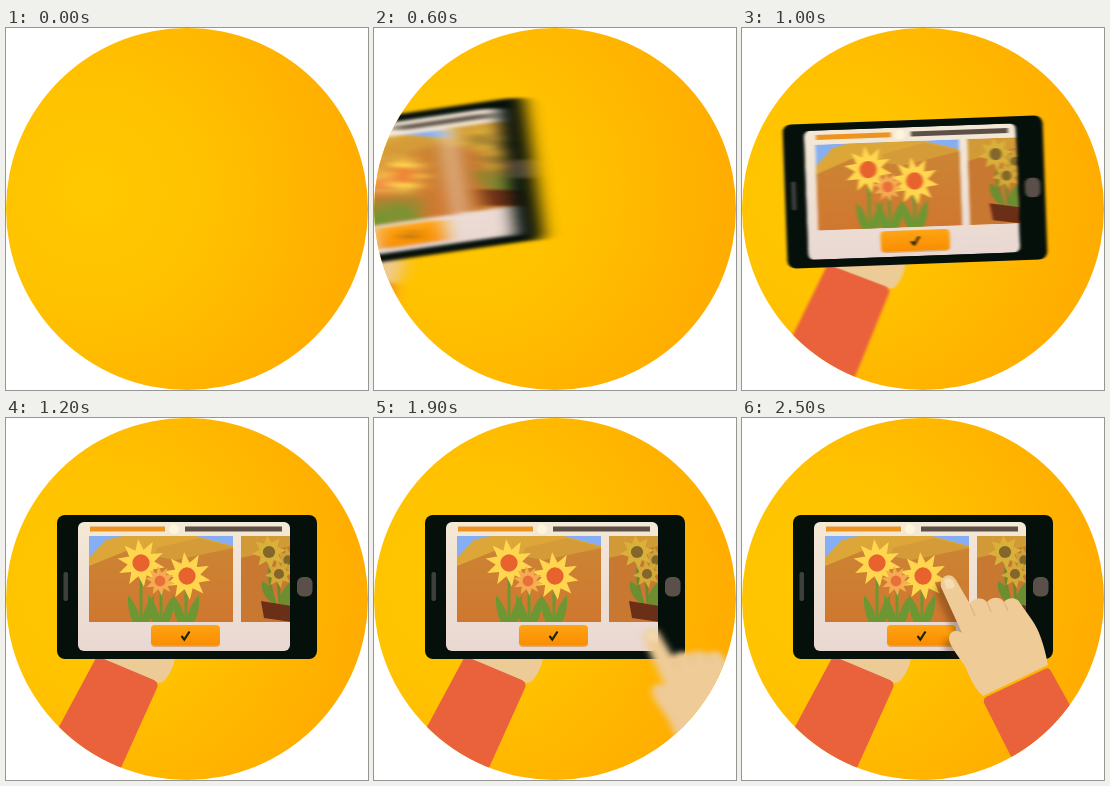
Animation of 362 by 362 pixels, one loop 2.6 s. Source, as an HTML page:

```html
<!DOCTYPE html>
<html lang="en">
<head>
<meta charset="utf-8">
<title>Phone in hand</title>
<style>
  html, body { margin: 0; width: 100%; height: 100%; overflow: hidden; background: #fff; }
  svg { display: block; width: 100vw; height: 100vh; }
</style>
</head>
<body>
<svg viewBox="0 0 362 362">
  <defs>
    <radialGradient id="sun" gradientUnits="userSpaceOnUse" cx="85" cy="165" r="285">
      <stop offset="0" stop-color="#ffc900"/>
      <stop offset=".4" stop-color="#ffc200"/>
      <stop offset="1" stop-color="#ffab00"/>
    </radialGradient>
    <linearGradient id="gold" x2="0" y2="1">
      <stop offset="0" stop-color="#ffa414"/>
      <stop offset="1" stop-color="#f98d00"/>
    </linearGradient>
    <linearGradient id="paper" x2="0" y2="1">
      <stop offset="0" stop-color="#f4e8d6"/>
      <stop offset="1" stop-color="#e9d8d2"/>
    </linearGradient>
    <linearGradient id="soil" x2="0" y2="1">
      <stop offset="0" stop-color="#cb8434"/>
      <stop offset="1" stop-color="#d0772f"/>
    </linearGradient>
    <clipPath id="disc"><circle cx="181" cy="181" r="181"/></clipPath>
    <clipPath id="screen"><rect x="72" y="104" width="212" height="129" rx="6"/></clipPath>
    <clipPath id="photo"><rect x="83" y="118" width="144" height="86"/></clipPath>
    <clipPath id="nextPhoto"><rect x="235" y="118" width="50" height="86"/></clipPath>
    <clipPath id="body"><rect x="51" y="97" width="260" height="144" rx="8"/></clipPath>
    <filter id="phoneBlur" filterUnits="userSpaceOnUse" x="-150" y="-50" width="660" height="460" color-interpolation-filters="sRGB"><feGaussianBlur/></filter>
    <filter id="handBlur" filterUnits="userSpaceOnUse" x="-50" y="-50" width="560" height="460" color-interpolation-filters="sRGB"><feGaussianBlur/></filter>
    <filter id="soft" filterUnits="userSpaceOnUse" x="150" y="120" width="200" height="200"><feGaussianBlur stdDeviation="3"/></filter>
    <path id="palm" d="M199 169C197 158 208 153 214 162L228 186C231 180 240 178 245 184C249 179 258 178 262 184C266 179 275 179 278 185L290 202C297 212 302 226 306 247L241 278C234 272 228 261 224 250C218 240 208 229 207 221C207 213 214 211 220 215Z"/>
  </defs>

  <g clip-path="url(#disc)">
    <rect width="362" height="362" fill="url(#sun)"/>

    <g id="phoneLayer"><g id="phone">
      <path d="M92 238H169C169 246 164 256 159 262Q156 266 150 264L92 240Z" fill="#edcb96"/>
      <path d="M90 240Q93 238 98 241L148 262Q153 265 151 270L105 372H19Z" fill="#e9623c"/>
      <rect x="51" y="97" width="260" height="144" rx="8" fill="#06100b"/>
      <rect x="57.5" y="154" width="4.5" height="29" rx="2" fill="#3f403c"/>
      <rect x="291" y="159" width="15.5" height="19.5" rx="6" fill="#5b4f4a"/>
      <g clip-path="url(#screen)">
        <rect x="72" y="104" width="212" height="129" fill="url(#paper)"/>
        <path d="M84 108.500h75v5h-75z" fill="#ed9420"/>
        <path d="M179 108.500h97v5h-97z" fill="#5d5048"/>
        <circle cx="168" cy="111" r="5" fill="#fff4dc"/>

        <g clip-path="url(#photo)">
          <rect x="83" y="118" width="144" height="86" fill="#86aef2"/>
          <path d="M83 140L100 122L116 118H190L227 128V204H83Z" fill="#dda638"/>
          <path d="M150 130L192 120L227 129V160H150Z" fill="#d59b38"/>
          <path d="M83 148L120 133L170 142L227 130V204H83Z" fill="url(#soil)"/>
          <g id="leaves" fill="#6d9733"></g>
          <g id="flowers"></g>
        </g>

        <g clip-path="url(#nextPhoto)">
          <rect x="235" y="118" width="50" height="86" fill="#d29a36"/>
          <path d="M235 140L285 128V204H235Z" fill="#c87830"/>
          <path d="M264 146Q262 165 269 186M272 160Q273 172 274 188" stroke="#71872e" stroke-width="3" fill="none"/>
          <path d="M268 186Q254 178 256 163Q268 168 270 187ZM273 188Q274 172 284 164V188Z" fill="#6d8d31"/>
          <g id="nextFlowers"></g>
          <path d="M255 183L285 188V204L258 200Z" fill="#6b2e16"/>
        </g>

        <rect x="145" y="208" width="69" height="21" rx="4" fill="#cf8e48" opacity=".6"/>
        <rect x="145" y="207" width="69" height="20.500" rx="4" fill="url(#gold)"/>
        <path d="M175.500 218L178.300 221.500L183.500 213.500" fill="none" stroke="#20200e" stroke-width="2.200"/>
      </g>
    </g></g>

    <g clip-path="url(#body)">
      <use id="shade" href="#palm" x="-5" y="7" fill="#301800" filter="url(#soft)"/>
    </g>
    <g id="handLayer"><g id="hand">
      <use href="#palm" fill="#eecb97"/>
      <path d="M202 163Q206 157 211 163L213 169Q208 172 204 170Z" fill="#f5dcb2"/>
      <path d="M245 184L249 194M262 184L266 193M228 186L233 198" stroke="#ddb580" stroke-width="1.200" fill="none"/>
      <path d="M244 279L303 251Q307 249 309 253L360 345L300 400L242 285Q241 281 244 279Z" fill="#e9623c"/>
    </g></g>
  </g>
</svg>

<script>
const $ = id => document.getElementById(id);
const NS = 'http://www.w3.org/2000/svg';
const LOOP = 2600, STEP = 100;

function add(parent, tag, attrs) {
  const el = document.createElementNS(NS, tag);
  for (const key in attrs) el.setAttribute(key, attrs[key]);
  parent.append(el);
}

function flower(parent, x, y, r, petal, core, petals = 10) {
  const points = Array.from({ length: petals * 2 }, (_, i) => {
    const angle = Math.PI * (i / petals - .5) - .12, d = i % 2 ? r * .56 : r;
    return [x + d * Math.cos(angle), y + d * Math.sin(angle)].map(n => n.toFixed(1));
  });
  add(parent, 'polygon', { points: points.join(' '), fill: petal });
  add(parent, 'circle', { cx: x, cy: y, r: r * .36, fill: core });
}

function plant(x, top) {
  add($('leaves'), 'path', { d: `M${x - 1.5} ${top}h3V204h-3z` });
  for (const side of [-1, 1])
    add($('leaves'), 'path', {
      d: `M${x} 204Q${x + side * 3} 188 ${x + side * 13} 177Q${x + side * 14} 194 ${x + side * 8} 204Z`
    });
}

plant(135, 150); plant(155, 168); plant(180, 160);
flower($('flowers'), 135, 145, 24, '#ffd64e', '#e8622d');
flower($('flowers'), 181, 158, 24, '#ffd64e', '#e8622d');
flower($('flowers'), 154, 163, 15, '#f6ab50', '#e9703a');
flower($('nextFlowers'), 282, 142, 13, '#c9a338', '#83662a', 8);
flower($('nextFlowers'), 263, 134, 17, '#d9b13a', '#83662a', 8);
flower($('nextFlowers'), 273, 156, 14, '#d3a937', '#83662a', 8);

// One row per step: dx, dy, rotation, horizontal blur
const phoneStart = 4, phoneMoves = [
  [-268, -4, -9, 12], [-208, -8, -8.8, 11], [-150, -11, -8.2, 9], [-102, -15, -7.2, 7],
  [-61, -16, -6, 4.5], [-29, -11, -4, 3], [-8, -5, -2.1, 1.6], [-2, -1, -.6, .6], [0, 0, 0, 0]
];
// One row per step: dx, dy, blur
const handStart = 17, handMoves = [
  [120, 83, 4], [95, 68, 4], [71, 53, 3.5], [49, 38, 2.5], [31, 25, 1.6],
  [16, 13, 1.1], [7, 6, .6], [2, 2, .2], [0, 0, 0]
];

function blur(name, x, y) {
  $(name + 'Blur').firstElementChild.setAttribute('stdDeviation', `${x} ${y}`);
  if (x) $(name + 'Layer').setAttribute('filter', `url(#${name}Blur)`);
  else $(name + 'Layer').removeAttribute('filter');
}

function pose(moves, start, step) {
  return step < start ? null : moves[Math.min(step - start, moves.length - 1)];
}

function show(name, on) {
  $(name + 'Layer').style.display = on ? '' : 'none';
}

let shown = -1;
function draw(step) {
  const phone = pose(phoneMoves, phoneStart, step);
  const hand = pose(handMoves, handStart, step);
  show('phone', phone);
  show('hand', hand);
  $('shade').setAttribute('opacity', Math.max(0, Math.min(.3, (step - 22) * .1)));
  if (phone) {
    const [x, y, turn, b] = phone;
    $('phone').setAttribute('transform', `translate(${x} ${y}) rotate(${turn} 181 169)`);
    blur('phone', b, b * .12);
  }
  if (hand) {
    const [x, y, b] = hand;
    $('hand').setAttribute('transform', `translate(${x} ${y})`);
    blur('hand', b, b * .7);
  }
}

function tick() {
  const step = Math.floor(performance.now() % LOOP / STEP);
  if (step !== shown) draw(shown = step);
  requestAnimationFrame(tick);
}
tick();
</script>
</body>
</html>
```
